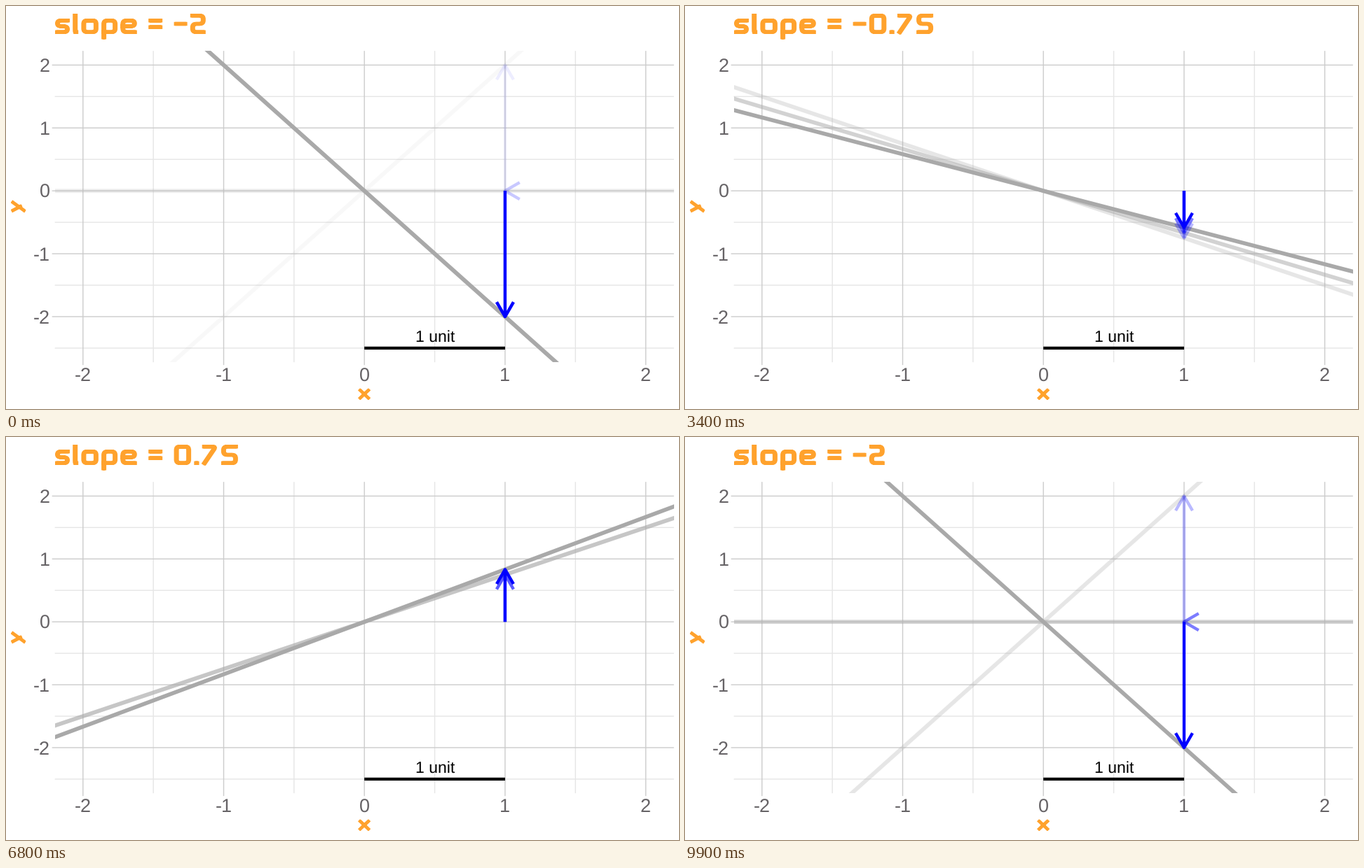
A matplotlib script that plays this animation: 960x576 px, repeating every 10 s.

```python
import numpy as np
import matplotlib.pyplot as plt
from matplotlib.animation import FuncAnimation
from matplotlib.patches import PathPatch, Rectangle
from matplotlib.path import Path
from matplotlib.transforms import Affine2D

plt.rcParams["text.hinting"] = "none"

W, H, DPI = 960, 576, 100
PX = 72 / DPI
ORANGE, LINE, BLUE = "#FFA22D", "#A9A9A9", "#0000FF"
X0, Y0, SX, SY = 511.2, 264.2, 200.7, 89.9
LEFT, RIGHT = X0 - 2.2 * SX, X0 + 2.2 * SX
TOP, BOTTOM = Y0 - 2.225 * SY, Y0 + 2.725 * SY
FRAMES, WAKE = 100, 5

# Lettering: each glyph has a width and a walk over lattice nodes, two per row:
# ab top, cd upper, ef middle, gh lower, ij bottom, kl descender; m is bottom centre
ROWS = (1, 0.7, 0.5, 0.3, 0, -0.45)
GLYPHS = {
    "s": (21, "baefji"), "l": (8, "aij"), "o": (24.5, "abjia"), "p": (23, "kabji"),
    "e": (23.5, "jiabfe"), "x": (24.5, "aj bi"), "y": (24.5, "bk am"),
    "0": (24.5, "abjia"), "1": (13, "abj"), "2": (22, "abfeij"), "5": (24, "baefji"),
    "7": (23, "abi"), "-": (19, "ef"), "=": (20, "cd gh"), ".": (7.2, "ij"), " ": (8, ""),
}
X_HEIGHT, CAP_HEIGHT, GAP = 22, 29, 4.2
PEN, NIB, CORNER = 5.4, 0.8, 5


def lattice(width, height):
    """Node positions on the centre line of the pen, y up from the baseline."""
    side, base = PEN / 2 + NIB, PEN / 2
    xs = (side, width - side)
    nodes = {chr(97 + 2 * r + c): (xs[c], base + row * (height - PEN))
             for r, row in enumerate(ROWS) for c in (0, 1)}
    nodes["m"] = (width / 2, base)
    return nodes


def bend(points):
    """Polyline with rounded corners; a closed loop starts mid-edge."""
    pts = [np.array(p, float) for p in points]
    if points[0] == points[-1]:
        mid = (pts[0] + pts[1]) / 2
        pts = [mid, *pts[1:], mid]
    verts, codes = [pts[0]], [Path.MOVETO]
    for a, b, c in zip(pts, pts[1:], pts[2:]):
        da, dc = np.hypot(*(a - b)), np.hypot(*(c - b))
        verts += [b + (a - b) * min(CORNER / da, 0.5), b,
                  b + (c - b) * min(CORNER / dc, 0.5)]
        codes += [Path.LINETO, Path.CURVE3, Path.CURVE3]
    return Path(verts + [pts[-1]], codes + [Path.LINETO])


def lettering(text, x, y, scale=1, turn=0):
    """Compound path of the text; each stroke is doubled to widen the stems."""
    place = Affine2D().scale(scale, -scale).rotate_deg(turn).translate(x, y)
    paths, pen = [], 0
    for ch in text:
        width, walks = GLYPHS[ch]
        height = X_HEIGHT if ch in "sopexy" else CAP_HEIGHT
        nodes = lattice(width, height)
        for walk in walks.split():
            path = bend([nodes[n] for n in walk])
            paths += [path.transformed(Affine2D().translate(pen + dx, 0))
                      for dx in (-NIB, NIB)]
        pen += width + GAP
    return place.transform_path(Path.make_compound_path(*paths))


def build_track():
    """Slope and titled state per frame: 17 states, hold and glide by turns."""
    states = np.linspace(-2, 2, 17)
    phases = 2 * len(states)
    edges = [-(-FRAMES * i // phases) for i in range(phases + 1)]
    track = []
    for p in range(phases):
        n = edges[p + 1] - edges[p]
        here, there = states[p // 2], states[(p + 1) // 2 % len(states)]
        track += [(here + (there - here) * j / n, here if j < n else there)
                  for j in range(1, n + 1)]
    return track


TRACK = build_track()

fig = plt.figure(figsize=(W / DPI, H / DPI), dpi=DPI, facecolor="white")
ax = fig.add_axes([0, 0, 1, 1])
ax.set_xlim(0, W)
ax.set_ylim(H, 0)
ax.axis("off")


def stroke(xs, ys, color, width, z, alpha=1):
    return ax.plot(xs, ys, color=color, lw=width * PX, zorder=z, alpha=alpha, snap=False,
                   solid_capstyle="butt", solid_joinstyle="round")[0]


def label(x, y, text, size, color, ha):
    ax.text(x, y, text, fontsize=size * PX, color=color, ha=ha, va="baseline",
            family="Liberation Sans", zorder=6)


def ink(path, width):
    return ax.add_patch(PathPatch(path, fill=False, ec=ORANGE, lw=width * PX, snap=False,
                                  capstyle="projecting", joinstyle="miter", zorder=6))


# Grid, ticks and axis labels
for v in np.arange(-2.5, 2.1, 0.5):
    major = v == int(v)
    color, z, tick = ("#CCCCCC", 1, 4) if major else ("#E6E6E6", 0, 0)
    x, y = X0 + v * SX, Y0 - v * SY
    stroke([LEFT - tick, RIGHT], [y, y], color, 1.4, z)
    if x > LEFT:
        stroke([x, x], [TOP, BOTTOM + tick], color, 1.4, z)
    if major:
        label(62.5, y + 9.7, f"{v:g}", 27, "#666366", "right")
        label(x, 536.5, f"{v:g}", 27, "#666366", "center")

ink(lettering("x", 503, 562, 0.66), 4)
ink(lettering("y", 22.5, 294.5, 0.66, -90), 4)
title = ink(lettering("slope = -2", 70, 40), PEN)

stroke([X0, X0 + SX], [Y0 + 2.5 * SY] * 2, "black", 4.3, 5)
label(612, 479.6, "1 unit", 23, "black", "center")

# Oldest echo first, the live line and arrow last
panel = Rectangle((LEFT, TOP), RIGHT - LEFT, BOTTOM - TOP, transform=ax.transData)
layers = []
for age in reversed(range(WAKE)):
    alpha = (1 - age / WAKE) ** 3
    line = stroke([], [], LINE, 5.7, 3, alpha)
    line.set_clip_path(panel)
    shaft, head = (stroke([], [], BLUE, 4.3, 4, alpha) for _ in range(2))
    layers.append((age, line, shaft, head))


def draw(i):
    title.set_path(lettering(f"slope = {TRACK[i][1]:g}", 70, 40))
    for age, line, shaft, head in layers:
        s = round(TRACK[(i - age) % FRAMES][0], 6)
        x, y = X0 + SX, Y0 - s * SY
        line.set_data([X0 - 3 * SX, X0 + 3 * SX], [Y0 + 3 * s * SY, Y0 - 3 * s * SY])
        shaft.set_data([x, x] if s else [], [Y0, y] if s else [])
        # A zero-length arrow has sign 0 and so points left
        barbs = np.sign(s) * np.pi / 2 + np.array([-1, 0, 1]) * np.pi / 6
        reach = np.array([24, 0, 24])
        head.set_data(x + reach * np.cos(barbs), y + reach * np.sin(barbs))
    return [title]


anim = FuncAnimation(fig, draw, frames=FRAMES, interval=100,
                     init_func=lambda: draw(0), repeat=True, repeat_delay=0)
plt.show()
```
